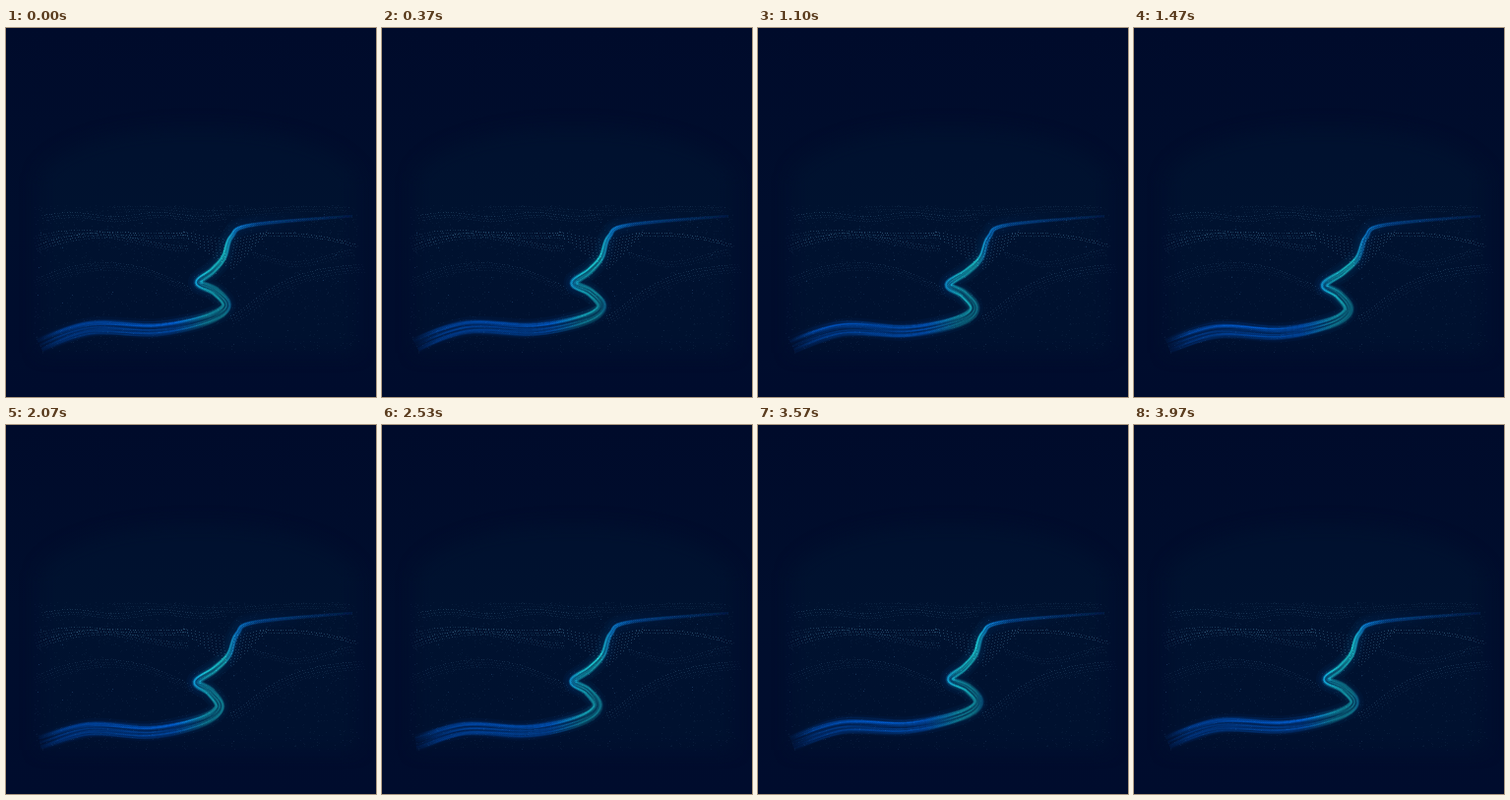
An HTML page with a canvas for the animation above (4.01 s loop, 376 by 375 pixels).

```html
<!DOCTYPE html>
<html>
<head>
<meta charset="utf-8">
<style>
  html, body { margin: 0; width: 100%; height: 100%; overflow: hidden; background: #000b2b; }
  canvas { display: block; }
</style>
</head>
<body>
<canvas id="stage" width="376" height="375"></canvas>
<script>
const W = 376, H = 375, LOOP = 4010, TAU = Math.PI * 2;
const { sin, cos, exp, PI } = Math;
const ctx = document.getElementById('stage').getContext('2d');

let seed = 7;
const rand = () => (seed = seed * 16807 % 2147483647) / 2147483647;

function dot(g, x, y, alpha) {
  g.fillStyle = `rgba(80,140,175,${alpha})`;
  g.fillRect(Math.round(x), Math.round(y), 1, 1);
}

function gradient(g, x, y, stops) {
  const fill = g.createLinearGradient(0, 0, x, y);
  for (const [at, color] of stops) fill.addColorStop(at / (x + y), color);
  return fill;
}

// Dotted hill lines: each has a span, a strength, a row count and a height rule
const ridges = [
  { from: 36, to: 222, alpha: 0.25, rows: 3, y: x => 189 + 2 * sin(x / 14) },
  { from: 110, to: 345, alpha: 0.14, rows: 3, y: x => 183 + 2 * sin(x / 28) },
  { from: 30, to: 184, alpha: 0.45, rows: 3, y: x => 207 + 13 * exp((30 - x) / 30) + sin(x / 20) },
  { from: 30, to: 184, alpha: 0.3, rows: 3, y: x => 213 - 8 * cos((x - 75) / 35) },
  { from: 258, to: 356, alpha: 0.42, rows: 2, y: x => 208 + (x - 280) ** 2 / 480 },
  { from: 250, to: 352, alpha: 0.18, rows: 3, y: x => 231 + 6 * sin((x - 262) / 20) },
  { from: 28, to: 188, alpha: 0.2, rows: 4, y: x => 238 + (x - 100) ** 2 / 290 },
  { from: 228, to: 362, alpha: 0.24, rows: 4, y: x => 238 + 54 * exp(-(((x - 228) / 52) ** 1.3)) }
];

// Columns of dots running down one side of the valley
function slope(x, step, fall, lean) {
  for (let i = 0; i < 11; i++) {
    for (let d = 0; d < 5 + fall * i; d += 3) {
      dot(scene, x + step * i + lean * d, 207 + 0.7 * i + d, 0.42 - 0.016 * i);
    }
  }
}

const scene = document.createElement('canvas').getContext('2d');
scene.canvas.width = W;
scene.canvas.height = H;

function paintScene() {
  scene.fillStyle = gradient(scene, 0, H, [[0, 'rgb(0,11,43)'], [190, 'rgb(0,14,45)'], [H, 'rgb(0,12,45)']]);
  scene.fillRect(0, 0, W, H);

  scene.filter = 'blur(9px)';
  scene.fillStyle = 'rgba(0,22,50,0.5)';
  scene.beginPath();
  scene.moveTo(34, 330);
  scene.lineTo(34, 150);
  scene.bezierCurveTo(75, 85, 315, 85, 357, 150);
  scene.lineTo(357, 330);
  scene.fill();
  scene.filter = 'none';

  for (const { from, to, alpha, rows, y } of ridges) {
    for (let r = 0; r < rows; r++) {
      for (let x = from; x < to; x += 2.6) {
        const edge = Math.min(1, (x - 16) / 30, (374 - x) / 30);
        dot(scene, x + r, y(x) + r * 2.6, alpha * edge * (0.4 + rand() * 0.9) / (1 + r * 0.3));
      }
    }
  }
  slope(180, 4, 2.3, 0.12);
  slope(264, -3.2, 2.8, -0.15);
  for (let i = 0; i < 2600; i++) {
    dot(scene, 28 + rand() * 330, 180 + 150 * rand() ** 1.3, rand() * 0.11);
  }
}

const sparks = Array.from({ length: 60 }, () => ({
  x: 32 + rand() * 320, y: 184 + rand() * 95, phase: rand() * TAU
}));

// The stream: rest course and the strands that follow it
const course = [[34, 322], [85, 306], [150, 308], [200, 298], [220, 285], [210, 270],
  [194, 260], [211, 247], [224, 233], [232, 212], [252, 200], [352, 191]];
const SPAN = 9, STEPS = (course.length - 1) * SPAN;

function courseAt(i) {
  const k = Math.min(Math.floor(i / SPAN), course.length - 2), t = i / SPAN - k;
  const point = n => course[Math.max(0, Math.min(n, course.length - 1))];
  const [a, b, c, d] = [k - 1, k, k + 1, k + 2].map(point);
  return [0, 1].map(n => b[n] + 0.5 * t * (c[n] - a[n] +
    t * (2 * a[n] - 5 * b[n] + 4 * c[n] - d[n] + t * (3 * (b[n] - c[n]) + d[n] - a[n]))));
}
const rest = Array.from({ length: STEPS + 1 }, (_, i) => courseAt(i));

// One slow sway per loop, reaching the near end of the stream last
function streamAt(turn) {
  return rest.map(([x, y], i) => {
    const s = i / STEPS;
    const sway = cos(turn - TAU * (0.4 + 0.25 * (1 - s) ** 3));
    return [x - 3.7 * sway * sin(TAU * s ** 1.3), y + 3.8 * sway * sin(PI * s ** 0.6) * (1 - s)];
  });
}

const strands = Array.from({ length: 34 }, (_, i) => ({
  offset: (i % 2 ? 1 : -1) * (0.5 + (rand() + rand() - 1) * 0.5),
  phase: rand() * TAU
}));
const strandTint = gradient(ctx, W, 0, [
  [34, 'rgba(0,60,130,.02)'], [56, 'rgba(0,62,135,.09)'], [100, 'rgba(0,64,138,.1)'],
  [170, 'rgba(2,70,145,.1)'], [202, 'rgba(18,120,105,.11)'], [222, 'rgba(20,125,105,.1)'],
  [234, 'rgba(10,85,125,.07)'], [256, 'rgba(8,70,125,.035)'], [352, 'rgba(10,60,120,.008)']
]);
const glowTint = gradient(ctx, W, 0, [
  [34, 'rgba(0,50,130,0)'], [70, 'rgba(0,50,120,.06)'], [180, 'rgba(0,55,120,.07)'],
  [215, 'rgba(0,75,95,.07)'], [245, 'rgba(0,60,120,.03)'], [310, 'rgba(0,50,120,0)']
]);

function trace(line, offset) {
  ctx.beginPath();
  line.forEach(([x, y], i) => {
    const a = line[Math.max(i - 1, 0)], b = line[Math.min(i + 1, STEPS)];
    const dx = b[0] - a[0], dy = b[1] - a[1], d = offset(i / STEPS) / Math.hypot(dx, dy);
    ctx.lineTo(x - dy * d, y + dx * d);
  });
  ctx.stroke();
}

function draw() {
  const turn = performance.now() % LOOP / LOOP * TAU;
  const line = streamAt(turn);

  ctx.globalCompositeOperation = 'source-over';
  ctx.drawImage(scene.canvas, 0, 0);
  ctx.globalCompositeOperation = 'lighter';
  for (const { x, y, phase } of sparks) dot(ctx, x, y, 0.12 * (1 + sin(turn * 2 + phase)));

  ctx.lineJoin = 'round';
  ctx.strokeStyle = glowTint;
  for (const w of [20, 15, 10]) {
    ctx.lineWidth = w;
    trace(line, () => 0);
  }
  ctx.strokeStyle = strandTint;
  ctx.lineWidth = 1.6;
  for (const { offset, phase } of strands) {
    trace(line, s => (1.2 + 7.6 * (1 - s)) * (offset + 0.14 * sin(s * 17 + phase - turn * 2)));
  }
  requestAnimationFrame(draw);
}

paintScene();
draw();
</script>
</body>
</html>
```
